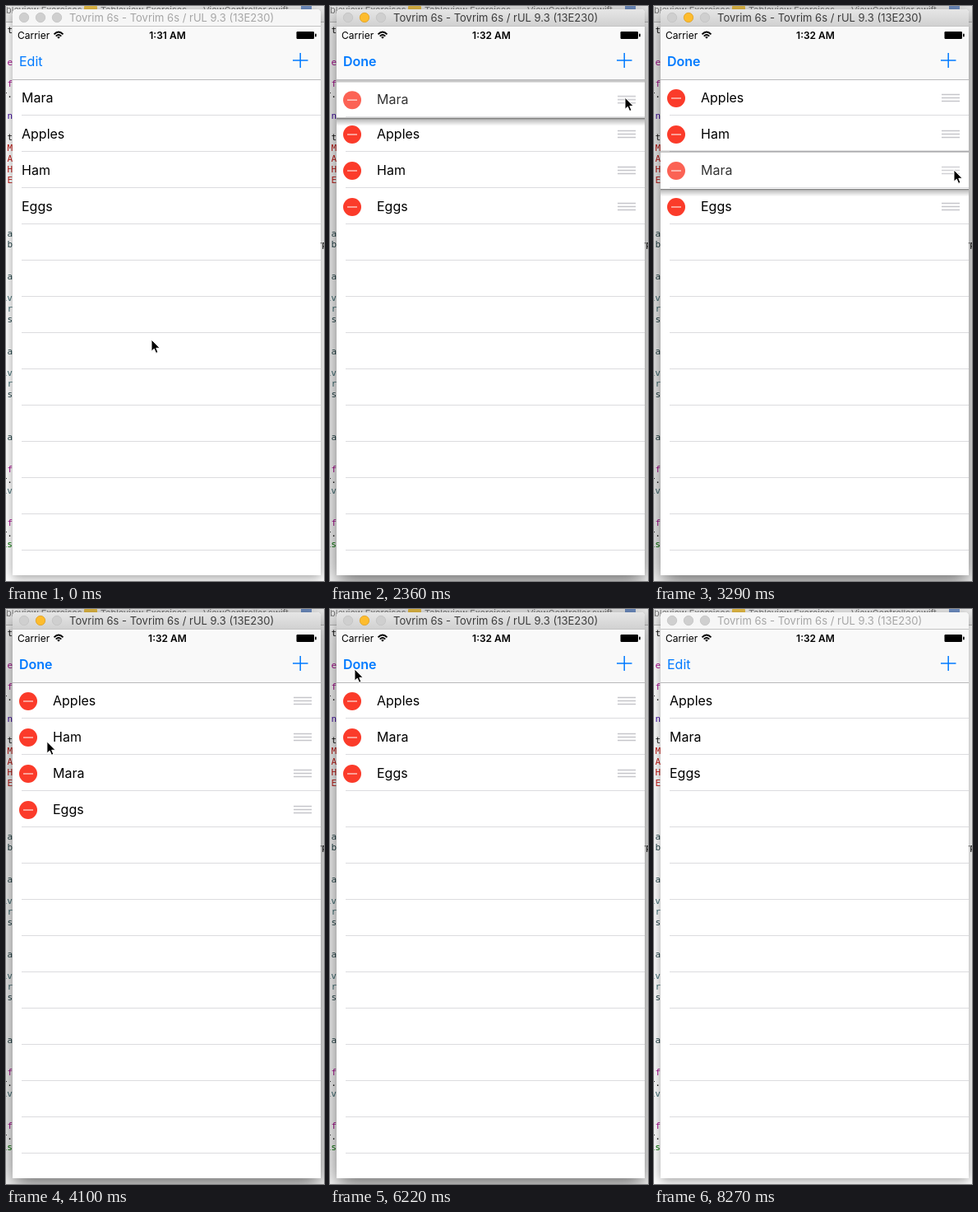
Write an HTML page that moves like this. It is 387 px wide and 698 px high and loops after 8320 ms.

```html
<!DOCTYPE html>
<html lang="en">
<head>
<meta charset="utf-8">
<title>Reordering a list</title>
<style>
  html, body { margin: 0; width: 100%; height: 100%; overflow: hidden; background: #fff; }
  svg { display: block; width: 387px; height: 698px; }
  text { font: 16px Inter, Roboto, sans-serif; white-space: pre; }
  .code { font: 11px "DejaVu Sans Mono", monospace; text-anchor: end; }
  .path { font-size: 11px; fill: #777; }
  .small { font-size: 12px; }
  .tint { fill: #007aff; }
  .bold { font-weight: 600; }
  .middle { text-anchor: middle; }
  .line { stroke: #dcdcdf; }
  .shadow { fill: #fff; filter: drop-shadow(0 3px 7px rgba(0,0,0,.38)); }
  .active .shadow { filter: drop-shadow(0 8px 13px rgba(0,0,0,.6)); }
  .bar { fill: #f6f6f6; }
  .active .bar { fill: url(#chrome); }
  .title { font-size: 13px; fill: #a6a6a6; }
  .active .title { fill: #3c3c3c; }
  .light { fill: #cfcfcf; stroke: #c2c2c2; stroke-width: .8; }
  .active .yellow { fill: #fdbc2e; stroke: #dfa023; }
</style>
</head>
<body>
<svg id="stage" viewBox="0 0 387 698">
  <defs>
    <linearGradient id="chrome" x2="0" y2="1">
      <stop stop-color="#e6e6e6"/><stop offset="1" stop-color="#d0d0d0"/>
    </linearGradient>
    <linearGradient id="fall" x2="0" y2="1">
      <stop stop-opacity=".62"/><stop offset=".25" stop-opacity=".25"/><stop offset="1" stop-opacity="0"/>
    </linearGradient>
    <clipPath id="screen"><rect x="8" y="25" width="375" height="666"/></clipPath>
    <clipPath id="cell"><rect x="8" y="133" width="375" height="44"/></clipPath>
  </defs>

  <rect width="387" height="19" fill="#ececec"/>
  <path d="M0 19.5H387" stroke="#bbb"/>
  <text class="path" x="0" y="9">bleview Exercises</text>
  <rect x="95" width="16" height="9" rx="1" fill="#e8bd45"/>
  <text class="path" x="115" y="9">Tableview Exercises</text>
  <text class="path" x="240" y="9">ViewController.swift</text>
  <rect x="359" width="13" height="9" fill="#6f8fc4"/>
  <g id="code"></g>

  <path class="shadow" d="M8 9q0-5 5-5H378q5 0 5 5V691H8Z"/>
  <path class="bar" d="M8 9q0-5 5-5H378q5 0 5 5V25H8Z"/>
  <path d="M8 24.5H383" stroke="#c4c4c4"/>
  <circle class="light" cx="22" cy="14" r="5.7"/>
  <circle class="light yellow" cx="42" cy="14" r="5.7"/>
  <circle class="light" cx="62" cy="14" r="5.7"/>
  <text class="title" x="77" y="19">Tovrim 6s - Tovrim 6s / rUL 9.3 (13E230)</text>

  <g clip-path="url(#screen)">
    <g id="list"></g>
    <rect x="8" y="25" width="375" height="64" fill="#f9f9f9"/>
    <path d="M8 89.5H383" stroke="#b9b9bb"/>
    <text class="small" x="14" y="39.5">Carrier</text>
    <g fill="none" stroke="#000" stroke-width="1.8">
      <path d="M58.5 34.3Q64 28.7 69.5 34.3M60.7 36.6Q64 33.3 67.3 36.6"/>
      <path d="M62.2 37.7Q64 36.2 65.8 37.7L64 39.7Z" fill="#000" stroke="none"/>
    </g>
    <text id="clock" class="small bold middle" x="196.5" y="39.5"></text>
    <rect x="353.5" y="31" width="21.5" height="9" rx="1.2"/>
    <rect x="376" y="33.5" width="1.7" height="4" rx=".8"/>
    <text id="edit" class="tint" x="16" y="73"></text>
    <path d="M349 66H367.5M358.2 57V75" stroke="#007aff" stroke-width="1.5"/>
  </g>
  <path id="cursor" d="M0 0V14.2L3.3 11.2L5.6 16.4L8 15.4L5.8 10.3H10.2Z" stroke="#fff"/>
</svg>

<script>
const LOOP = 8320, ROW = 44, TOP = 89.5;
const stage = document.getElementById("stage");
const byId = id => document.getElementById(id);
const set = (el, attrs) => { for (const k in attrs) el.setAttribute(k, attrs[k]); };

// Visible edge of the editor: baseline, characters, colour
const PURPLE = "#aa0d91", RED = "#c41a16", TEAL = "#26474b", BLACK = "#111", SLATE = "#3f6e74";
const code = [
  [33, "t", BLACK], [72, "e", PURPLE], [98, "f", PURPLE], [111, "r.", BLACK], [137, "n", "#3900a0"],
  [163, "t", BLACK], [176, "M", RED], [189, "A", RED], [202, "H", RED], [215, "E", RED],
  [280, "a", TEAL], [293, "b", TEAL], [332, "a", TEAL], [358, "iv", SLATE], [371, "r", SLATE],
  [384, "s", TEAL], [423, "a", TEAL], [449, "iv", SLATE], [462, "r", SLATE], [475, "s", TEAL],
  [527, "a", TEAL], [566, "f", PURPLE], [579, "r.", BLACK], [592, "iv", SLATE],
  [631, "f", PURPLE], [644, "r.", BLACK], [657, "is", "#007400"]
];
byId("code").innerHTML = code.map(([y, s, fill]) =>
  `<text class="code" x="8" y="${y}" fill="${fill}">${s}</text>`).join("") +
  `<text class="code" x="391" y="293">yp</text>`;

// Later names are drawn on top
const names = ["Ham", "Apples", "Eggs", "Mara"];
const lines = Array.from({ length: 11 }, (_, i) => `M19 ${132.5 + ROW * (i + 2)}H383`).join("");
byId("list").innerHTML = `<path class="line" d="${lines}"/>` + names.map(name => `
  <g id="${name}">
    <g class="lift">
      <rect x="8" y="44" width="375" height="10" fill="url(#fall)"/>
      <rect x="8" y="-2" width="375" height="3" opacity=".22"/>
    </g>
    <rect class="back" x="8" y=".5" width="375" height="44" fill="#fff"/>
    <path class="line" d="M19 43H383"/>
    <g class="content">
      <text class="label" y="27.5">${name}</text>
      <g class="controls">
        <circle cx="27" cy="22.5" r="11" fill="#fb3b2a"/>
        <path d="M21 22.5H33" stroke="#ffd5d0" stroke-width="1.3"/>
        <path d="M350 18H372M350 22H372M350 26H372" stroke="#c5c5ca" stroke-width="1.6"/>
      </g>
    </g>
    <g class="delete">
      <rect x="383" y=".5" width="76" height="43" fill="#ff3b30"/>
      <text x="396" y="27.5" fill="#fff">Delete</text>
    </g>
  </g>`).join("");
byId("Ham").insertAdjacentHTML("beforebegin", '<g id="hamClip"></g>');
byId("hamClip").append(byId("Ham"));

const progress = (t, start, length) => Math.min(1, Math.max(0, (t - start) / length));
const ease = (t, start, length = 300) => {
  const p = progress(t, start, length);
  return p * p * (3 - 2 * p);
};

function track(keys, t) {
  let i = 1;
  while (i < keys.length - 1 && t > keys[i][0]) i++;
  const [a, b] = [keys[i - 1], keys[i]], p = progress(t, a[0], b[0] - a[0]);
  return a.slice(1).map((v, k) => v + (b[k + 1] - v) * p);
}

// time, x, y
const pointer = [
  [240, 177, 405], [1010, 28, 66], [1150, 28, 66], [1530, 251, 121], [1950, 356, 111],
  [2010, 358, 109], [2240, 358, 109], [2360, 359, 111], [2820, 364, 187], [3060, 365, 199],
  [3450, 365, 199], [4100, 50, 161], [4280, 27, 155], [4700, 27, 155], [5340, 345, 161],
  [5800, 345, 161], [6220, 30, 73], [6390, 28, 68], [6800, 28, 68], [7380, 147, 286], [8090, 364, 716]
];
const drag = [[2240, 0], [2360, 2], [2560, 31], [2820, 77.5], [3060, 88]];

function draw(t) {
  stage.classList.toggle("active", t >= 1010 && t < 8270);
  byId("clock").textContent = t < 1350 ? "1:31 AM" : "1:32 AM";
  const editing = t >= 1120 && t < 6600;
  byId("edit").textContent = editing ? "Done" : "Edit";
  byId("edit").classList.toggle("bold", editing);

  const edit = ease(t, 1120) - ease(t, 6600);
  const removed = ease(t, 5690);
  const lifted = ease(t, 2240, 120) - ease(t, 3290, 250);
  const swipe = 76 * ease(t, 4580);
  const tops = {
    Apples: ROW * (1 - ease(t, 2560)),
    Ham: ROW * (2 - ease(t, 2710)),
    Mara: track(drag, t)[0] - ROW * removed,
    Eggs: ROW * (3 - removed)
  };

  for (const name of names) {
    const row = byId(name), part = c => row.querySelector("." + c);
    const lift = name === "Mara" ? lifted : 0, shift = name === "Ham" ? swipe : 0;
    set(row, { transform: `translate(0 ${TOP + tops[name]})` });
    set(part("lift"), { opacity: lift });
    set(part("back"), { opacity: 1 - .15 * lift });
    set(part("content"), { transform: `translate(${-shift} 0)`, opacity: 1 - .2 * lift });
    set(part("label"), { x: 19 + 38 * edit });
    set(part("controls"), { opacity: edit });
    set(part("delete"), { transform: `translate(${-shift} 0)` });
  }
  // The row under the dragged one stays legible through it
  const dragging = t >= 2240 && t < 3290;
  set(byId("Mara").querySelector(".back"), { opacity: dragging ? 0.1 : 1 });
  set(byId("Mara").querySelector(".lift rect"), { y: 44 });
  set(byId("hamClip"), { opacity: 1 - removed, "clip-path": t >= 4580 ? "url(#cell)" : "none" });

  const [x, y] = track(pointer, t);
  set(byId("cursor"), { transform: `translate(${x} ${y})` });
}

function tick(now) {
  draw(now % LOOP);
  requestAnimationFrame(tick);
}
draw(0);
requestAnimationFrame(tick);
</script>
</body>
</html>
```
